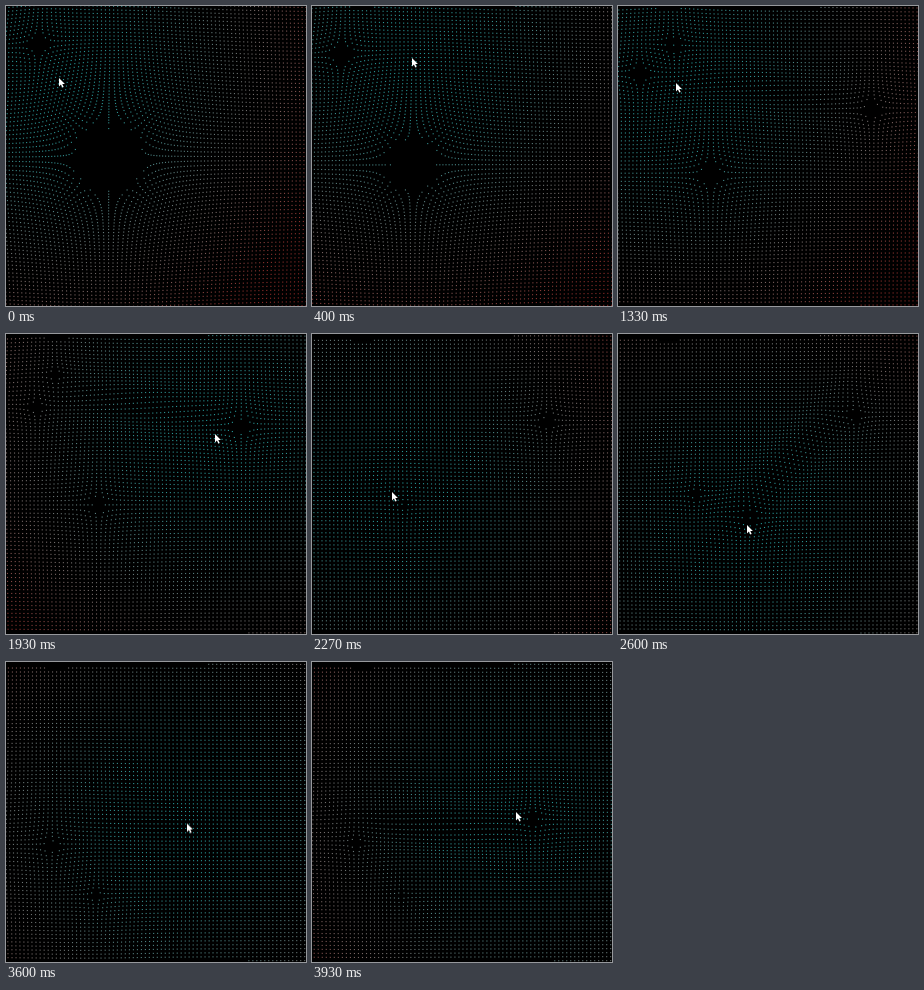
An HTML page without scripts for the animation above (4000 ms loop, 300 px wide and 300 px high).

```html
<!DOCTYPE html>
<html lang="en">
<head>
<meta charset="utf-8">
<title>Dot field</title>
<style>
/* grid indices */
@property --a { syntax: "<number>"; inherits: true; initial-value: 0 }
@property --b { syntax: "<number>"; inherits: true; initial-value: 0 }
@property --c { syntax: "<number>"; inherits: true; initial-value: 0 }
@property --e { syntax: "<number>"; inherits: true; initial-value: 0 }
/* four holes: centre and radius */
@property --x1 { syntax: "<number>"; inherits: true; initial-value: 0 }
@property --y1 { syntax: "<number>"; inherits: true; initial-value: 0 }
@property --r1 { syntax: "<number>"; inherits: true; initial-value: 0 }
@property --x2 { syntax: "<number>"; inherits: true; initial-value: 0 }
@property --y2 { syntax: "<number>"; inherits: true; initial-value: 0 }
@property --r2 { syntax: "<number>"; inherits: true; initial-value: 0 }
@property --x3 { syntax: "<number>"; inherits: true; initial-value: 0 }
@property --y3 { syntax: "<number>"; inherits: true; initial-value: 0 }
@property --r3 { syntax: "<number>"; inherits: true; initial-value: 0 }
@property --x4 { syntax: "<number>"; inherits: true; initial-value: 0 }
@property --y4 { syntax: "<number>"; inherits: true; initial-value: 0 }
@property --r4 { syntax: "<number>"; inherits: true; initial-value: 0 }
/* trail: centre, angle, depth */
@property --tx { syntax: "<number>"; inherits: true; initial-value: 0 }
@property --ty { syntax: "<number>"; inherits: true; initial-value: 0 }
@property --tq { syntax: "<number>"; inherits: true; initial-value: 0 }
@property --tk { syntax: "<number>"; inherits: true; initial-value: 0 }
@property --cos { syntax: "<number>"; inherits: true; initial-value: 1 }
@property --sin { syntax: "<number>"; inherits: true; initial-value: 0 }
/* per dot: place, distances to the holes, pushes, trail coordinates */
@property --x { syntax: "<number>"; inherits: true; initial-value: 0 }
@property --y { syntax: "<number>"; inherits: true; initial-value: 0 }
@property --d1 { syntax: "<number>"; inherits: false; initial-value: 1 }
@property --d2 { syntax: "<number>"; inherits: false; initial-value: 1 }
@property --d3 { syntax: "<number>"; inherits: false; initial-value: 1 }
@property --d4 { syntax: "<number>"; inherits: false; initial-value: 1 }
@property --k1 { syntax: "<number>"; inherits: false; initial-value: 0 }
@property --k2 { syntax: "<number>"; inherits: false; initial-value: 0 }
@property --k3 { syntax: "<number>"; inherits: false; initial-value: 0 }
@property --k4 { syntax: "<number>"; inherits: false; initial-value: 0 }
@property --u { syntax: "<number>"; inherits: false; initial-value: 0 }
@property --v { syntax: "<number>"; inherits: false; initial-value: 0 }
@property --w { syntax: "<number>"; inherits: false; initial-value: 0 }

html, body { margin: 0; width: 100%; height: 100%; overflow: hidden; background: #000 }
svg { display: block; width: 300px; height: 300px }

.field {
  --cos: cos(var(--tq) * 1deg);
  --sin: sin(var(--tq) * 1deg);
  animation: 4s -5ms infinite steps(3);
  animation-name: hole1, hole2, hole3, hole4, trail;
}
.row { --y: calc(var(--e) * 20 + var(--c) * 4 + 2) }
/* every hole pushes outwards by r * exp(-distance / reach) */
.d {
  --x: calc(var(--b) * 20 + var(--a) * 4 + 2);
  --d1: hypot(var(--x) - var(--x1), var(--y) - var(--y1), .5);
  --d2: hypot(var(--x) - var(--x2), var(--y) - var(--y2), .5);
  --d3: hypot(var(--x) - var(--x3), var(--y) - var(--y3), .5);
  --d4: hypot(var(--x) - var(--x4), var(--y) - var(--y4), .5);
  --k1: calc(var(--r1) * exp(0 - var(--d1) / 85) / var(--d1));
  --k2: calc(var(--r2) * exp(0 - var(--d2) / 40) / var(--d2));
  --k3: calc(var(--r3) * exp(0 - var(--d3) / 40) / var(--d3));
  --k4: calc(var(--r4) * exp(0 - var(--d4) / 40) / var(--d4));
  --u: calc(((var(--y) - var(--ty)) * var(--cos) - (var(--x) - var(--tx)) * var(--sin)) / 18);
  --v: calc(((var(--x) - var(--tx)) * var(--cos) + (var(--y) - var(--ty)) * var(--sin)) / 95);
  --w: calc(var(--tk) * var(--u) * exp(0 - var(--u) * var(--u) - var(--v) * var(--v)));
  transform: translate(
    calc(1px * (var(--x) + (var(--x) - var(--x1)) * var(--k1) + (var(--x) - var(--x2)) * var(--k2) + (var(--x) - var(--x3)) * var(--k3) + (var(--x) - var(--x4)) * var(--k4) - var(--w) * var(--sin))),
    calc(1px * (var(--y) + (var(--y) - var(--y1)) * var(--k1) + (var(--y) - var(--y2)) * var(--k2) + (var(--y) - var(--y3)) * var(--k3) + (var(--y) - var(--y4)) * var(--k4) + var(--w) * var(--cos))));
  width: 1.1px; height: 1.1px; fill: #fff;
}
.glow { mix-blend-mode: multiply }
.mouse { animation: mouse 4s -5ms infinite steps(3) }

@keyframes hole1 {
  0% { --x1: 102; --y1: 151; --r1: 32; animation-timing-function: steps(6) }
  10% { --x1: 99; --y1: 158; --r1: 23; animation-timing-function: steps(6) }
  20% { --x1: 97; --y1: 164; --r1: 15; animation-timing-function: steps(8) }
  33.333% { --x1: 92; --y1: 167; --r1: 8.5; animation-timing-function: steps(9) }
  48.333% { --x1: 91; --y1: 170; --r1: 5; animation-timing-function: steps(7) }
  60% { --x1: 91; --y1: 171; --r1: 0; animation-timing-function: steps(1) }
  61.667% { --x1: 136; --y1: 160; --r1: 1; animation-timing-function: steps(2) }
  65% { --x1: 130; --y1: 182; --r1: 4; animation-timing-function: steps(7) }
  76.667% { --x1: 50; --y1: 200; --r1: 4; animation-timing-function: steps(2) }
  80% { --x1: 48; --y1: 186; --r1: 6; animation-timing-function: steps(11) }
  98.333%, 100% { --x1: 44; --y1: 180; --r1: 3 }
}
@keyframes hole2 {
  0% { --x2: 36; --y2: 44; --r2: 7; animation-timing-function: steps(12) }
  20% { --x2: 29; --y2: 61; --r2: 9; animation-timing-function: steps(8) }
  33.333% { --x2: 24; --y2: 68; --r2: 6; animation-timing-function: steps(9) }
  48.333% { --x2: 31; --y2: 72; --r2: 4; animation-timing-function: steps(4) }
  55% { --x2: 31; --y2: 74; --r2: 0; animation-timing-function: steps(1) }
  56.667% { --x2: 79; --y2: 161; --r2: 1; animation-timing-function: steps(5) }
  65% { --x2: 79; --y2: 161; --r2: 3; animation-timing-function: steps(9) }
  80%, 100% { --x2: 79; --y2: 161; --r2: 0 }
}
@keyframes hole3 {
  0%, 15% { --x3: 252; --y3: 94; --r3: 0 }
  20% { --x3: 254; --y3: 95; --r3: 5; animation-timing-function: steps(8) }
  33.333% { --x3: 253; --y3: 103; --r3: 6; animation-timing-function: steps(9) }
  48.333% { --x3: 234; --y3: 92; --r3: 6; animation-timing-function: steps(10) }
  65% { --x3: 235; --y3: 81; --r3: 4; animation-timing-function: steps(9) }
  80% { --x3: 236; --y3: 76; --r3: 3; animation-timing-function: steps(4) }
  86.667% { --x3: 236; --y3: 76; --r3: 0; animation-timing-function: steps(2) }
  90% { --x3: 222; --y3: 158; --r3: 0; animation-timing-function: steps(5) }
  98.333%, 100% { --x3: 221; --y3: 158; --r3: 4 }
}
@keyframes hole4 {
  0%, 28.333% { --x4: 54; --y4: 42; --r4: 0 }
  33.333% { --x4: 54; --y4: 42; --r4: 5; animation-timing-function: steps(9) }
  48.333% { --x4: 48; --y4: 44; --r4: 3 }
  53.333% { --x4: 48; --y4: 44; --r4: 0; animation-timing-function: steps(11) }
  71.667% { --x4: 92; --y4: 228; --r4: 0; animation-timing-function: steps(5) }
  80% { --x4: 88; --y4: 230; --r4: 5; animation-timing-function: steps(11) }
  98.333%, 100% { --x4: 88; --y4: 232; --r4: 1 }
}
@keyframes trail {
  0%, 5% { --tx: 145; --ty: 68; --tq: 13; --tk: 0; animation-timing-function: steps(9) }
  20% { --tx: 145; --ty: 68; --tq: 13; --tk: 5; animation-timing-function: steps(8) }
  33.333% { --tx: 150; --ty: 86; --tq: 8; --tk: 5; animation-timing-function: steps(9) }
  48.333% { --tx: 140; --ty: 72; --tq: 9; --tk: 7; animation-timing-function: steps(4) }
  55% { --tx: 140; --ty: 78; --tq: 8; --tk: 0; animation-timing-function: steps(1) }
  56.667% { --tx: 175; --ty: 125; --tq: -45; --tk: 0; animation-timing-function: steps(5) }
  65% { --tx: 175; --ty: 125; --tq: -45; --tk: 7; animation-timing-function: steps(9) }
  80% { --tx: 168; --ty: 128; --tq: -45; --tk: 5; animation-timing-function: steps(4) }
  86.667% { --tx: 165; --ty: 128; --tq: -45; --tk: 0; animation-timing-function: steps(1) }
  88.333% { --tx: 135; --ty: 163; --tq: 3; --tk: 1; animation-timing-function: steps(6) }
  98.333%, 100% { --tx: 135; --ty: 163; --tq: 3; --tk: 8 }
}
@keyframes mouse {
  0% { transform: translate(53px, 72px) }
  5% { transform: translate(30px, 58px) }
  10% { transform: translate(100px, 52px) }
  15% { transform: translate(205px, 80px); animation-timing-function: steps(2) }
  18.333% { transform: translate(252px, 94px); animation-timing-function: steps(1) }
  20% { transform: translate(224px, 99px) }
  25% { transform: translate(140px, 75px) }
  30% { transform: translate(45px, 43px); animation-timing-function: steps(2) }
  33.333% { transform: translate(58px, 77px) }
  38.333% { transform: translate(120px, 72px) }
  43.333% { transform: translate(225px, 78px); animation-timing-function: steps(2) }
  46.667% { transform: translate(236px, 88px); animation-timing-function: steps(1) }
  48.333% { transform: translate(209px, 100px); animation-timing-function: steps(5) }
  56.667% { transform: translate(80px, 158px) }
  61.667% { transform: translate(138px, 152px); animation-timing-function: steps(2) }
  65% { transform: translate(129px, 191px); animation-timing-function: steps(4) }
  71.667% { transform: translate(115px, 235px) }
  76.667% { transform: translate(50px, 222px); animation-timing-function: steps(1) }
  78.333% { transform: translate(46px, 188px); animation-timing-function: steps(1) }
  80% { transform: translate(68px, 172px); animation-timing-function: steps(4) }
  86.667% { transform: translate(140px, 165px); animation-timing-function: steps(4) }
  93.333% { transform: translate(222px, 158px) }
  98.333%, 100% { transform: translate(204px, 150px) }
}
</style>
</head>
<body>
<svg viewBox="0 0 300 300">
  <defs>
    <radialGradient id="tint" gradientUnits="userSpaceOnUse" cx="0" cy="0" r="400">
      <stop offset="0" stop-color="#209c9c"/>
      <stop offset=".2" stop-color="#309090"/>
      <stop offset=".42" stop-color="#687676"/>
      <stop offset=".54" stop-color="#786462"/>
      <stop offset=".7" stop-color="#8c302c"/>
      <stop offset="1" stop-color="#941616"/>
    </radialGradient>
    <g id="five">
      <rect class="d"/>
      <rect class="d" style="--a:1"/>
      <rect class="d" style="--a:2"/>
      <rect class="d" style="--a:3"/>
      <rect class="d" style="--a:4"/>
    </g>
    <g id="row" class="row">
      <use href="#five"/>
      <use href="#five" style="--b:1"/>
      <use href="#five" style="--b:2"/>
      <use href="#five" style="--b:3"/>
      <use href="#five" style="--b:4"/>
      <use href="#five" style="--b:5"/>
      <use href="#five" style="--b:6"/>
      <use href="#five" style="--b:7"/>
      <use href="#five" style="--b:8"/>
      <use href="#five" style="--b:9"/>
      <use href="#five" style="--b:10"/>
      <use href="#five" style="--b:11"/>
      <use href="#five" style="--b:12"/>
      <use href="#five" style="--b:13"/>
      <use href="#five" style="--b:14"/>
    </g>
    <g id="band">
      <use href="#row"/>
      <use href="#row" style="--c:1"/>
      <use href="#row" style="--c:2"/>
      <use href="#row" style="--c:3"/>
      <use href="#row" style="--c:4"/>
    </g>
  </defs>
  <rect width="300" height="300"/>
  <g class="field">
    <use href="#band"/>
    <use href="#band" style="--e:1"/>
    <use href="#band" style="--e:2"/>
    <use href="#band" style="--e:3"/>
    <use href="#band" style="--e:4"/>
    <use href="#band" style="--e:5"/>
    <use href="#band" style="--e:6"/>
    <use href="#band" style="--e:7"/>
    <use href="#band" style="--e:8"/>
    <use href="#band" style="--e:9"/>
    <use href="#band" style="--e:10"/>
    <use href="#band" style="--e:11"/>
    <use href="#band" style="--e:12"/>
    <use href="#band" style="--e:13"/>
    <use href="#band" style="--e:14"/>
  </g>
  <rect class="glow mouse" x="-400" y="-400" width="800" height="800" fill="url(#tint)"/>
  <path class="mouse" d="M0 0V8.4L1.9 6.6 3.3 9.6 4.7 9 3.3 6H5.9Z" fill="#fff"/>
</svg>
</body>
</html>
```
